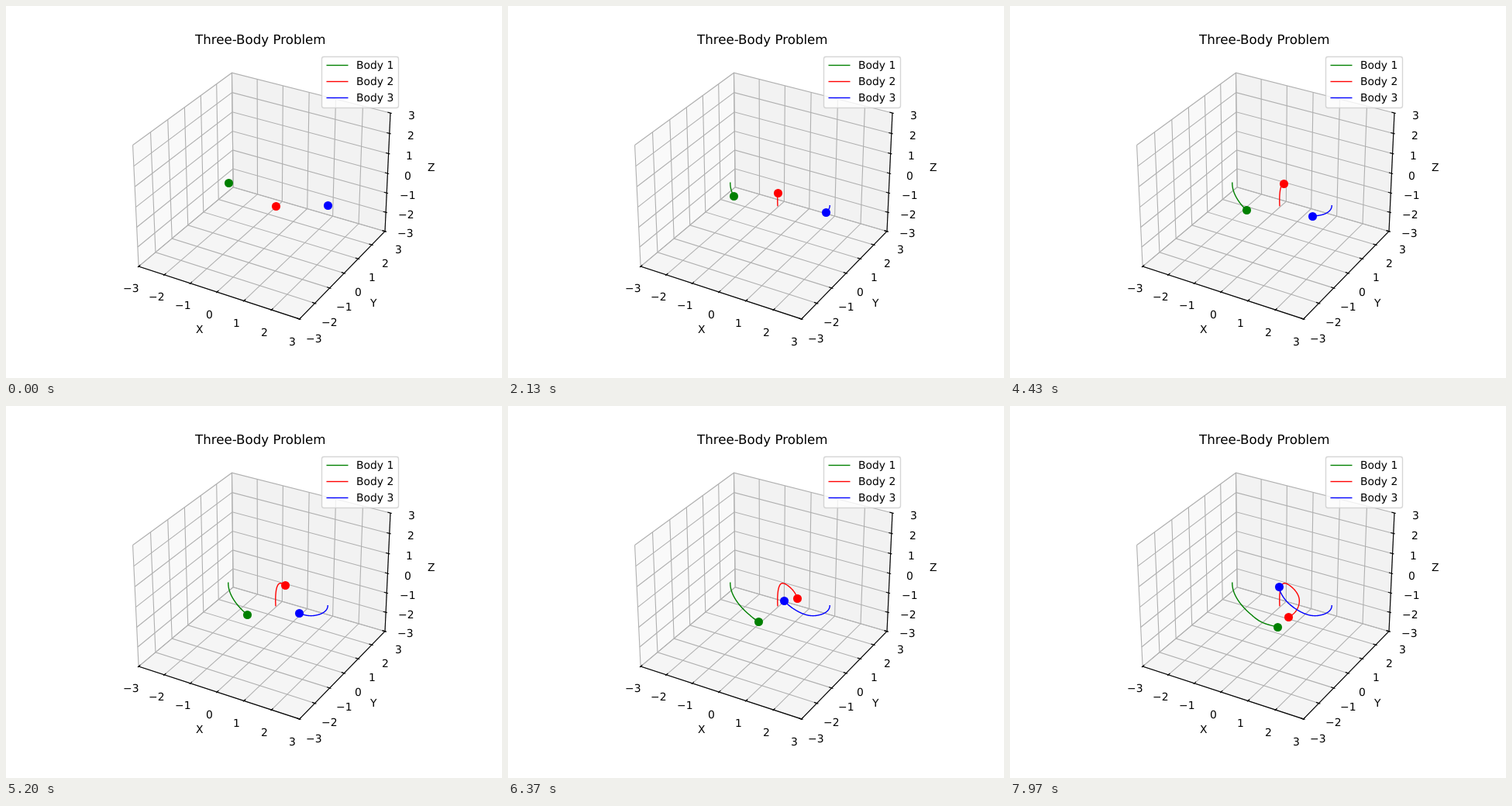
Recreate the animation shown at these times as an HTML page with a canvas. Size 640 by 480 pixels, loop 8000 ms.

```html
<!DOCTYPE html>
<html lang="en">
<head>
<meta charset="utf-8">
<title>Three-Body Problem</title>
<style>
  html, body { margin: 0; width: 100%; height: 100%; overflow: hidden; background: #fff; }
  canvas { display: block; }
</style>
</head>
<body>
<canvas id="stage" width="640" height="480"></canvas>
<script>
const ctx = document.getElementById('stage').getContext('2d');
const LOOP = 8000, STEP = 100 / 3, LIM = 3;
const BODIES = [
  { name: 'Body 1', color: '#008000' },
  { name: 'Body 2', color: '#ff0000' },
  { name: 'Body 3', color: '#0000ff' }
];
// Time in ms, then x and y of each body
const KNOTS = [
  [0, 286.8, 227.6, 348, 258.4, 415.2, 257],
  [2130, 291, 245, 348.2, 241, 410.3, 266],
  [3600, 299, 257, 350.3, 232, 400, 270],
  [5200, 311, 269, 360, 231, 378, 267],
  [6370, 323, 278, 373, 248, 356, 251],
  [7170, 333, 282, 370, 263, 348, 238],
  [7970, 345, 285, 359, 272, 347, 233]
];
const TICKS = [-3, -2, -1, 0, 1, 2, 3];

// Perspective view: elevation 30°, azimuth -60°, box aspect 4:4:3
function project([x, y, z]) {
  const px = x * 0.19841, py = y * 0.19841, pz = z * 0.14881;
  const c = Math.sqrt(3) / 2;
  const right = c * px + 0.5 * py;
  const up = -0.25 * px + c / 2 * py + c * pz;
  const depth = 10 - (c / 2 * px - 0.75 * py + 0.5 * pz);
  return [333 + 1997.8 * right / depth, 237.4 - 1997.8 * up / depth];
}

function trace(g, points) {
  g.beginPath();
  points.forEach(([x, y]) => g.lineTo(x, y));
}

function line(g, points, color, width) {
  trace(g, points);
  g.strokeStyle = color;
  g.lineWidth = width;
  g.stroke();
}

function pane(g, color, corners) {
  trace(g, corners.map(project));
  g.fillStyle = color;
  g.fill();
}

function text(g, str, x, y, size = 13.89) {
  g.font = `${size}px "DejaVu Sans", sans-serif`;
  g.textRendering = 'geometricPrecision';
  g.fillStyle = '#000';
  g.fillText(str, Math.round(x), Math.round(y));
}

// The pen starts half an ink width left of x
function centered(g, str, x, y, size = 13.89) {
  g.font = `${size}px "DejaVu Sans", sans-serif`;
  const ink = g.measureText(str);
  text(g, str, x - (ink.actualBoundingBoxLeft + ink.actualBoundingBoxRight) / 2, y, size);
}

function drawAxes(g) {
  const L = LIM, PAD = 0.498;
  g.fillStyle = '#fff';
  g.fillRect(0, 0, 640, 480);
  pane(g, '#f9f9f9', [[-L, -L, -L], [-L, L, -L], [-L, L, L], [-L, -L, L]]);
  pane(g, '#f2f2f2', [[-L, L, -L], [L, L, -L], [L, L, L], [-L, L, L]]);
  pane(g, '#f5f5f5', [[-L, -L, -L], [L, -L, -L], [L, L, -L], [-L, L, -L]]);

  // at: point on the axis moved out by d along the tick and e along the other edge
  const axes = [
    { at: (v, d, e) => [v, -L - d, -L - e], grid: v => [[v, -L, -L], [v, L, -L], [v, L, L]] },
    { at: (v, d, e) => [L + d, v, -L - e], grid: v => [[L, v, -L], [-L, v, -L], [-L, v, L]] },
    { at: (v, d, e) => [L + d, L + e, v], grid: v => [[L, L, v], [-L, L, v], [-L, -L, v]] }
  ];
  for (const { grid } of axes)
    for (const v of TICKS) line(g, grid(v).map(project), '#b0b0b0', 1.11);

  for (const { at } of axes) {
    line(g, [at(-L, 0, 0), at(L, 0, 0)].map(project), '#000', 1.11);
    for (const v of TICKS) {
      line(g, [at(v, -0.1, 0), at(v, 0.05, 0)].map(project), '#000', 1.11);
      const [x, y] = project(at(v, PAD, PAD));
      centered(g, v < 0 ? '\u2212' + -v : '' + v, x, y + 11);
    }
  }
  centered(g, 'X', 249.6, 422);
  centered(g, 'Y', 475, 388);
  centered(g, 'Z', 548, 213);
  centered(g, 'Three-Body Problem', 328, 49, 16.67);
}

function drawLegend(g) {
  g.beginPath();
  g.roundRect(407.5, 65.5, 99, 66, 2.8);
  g.fillStyle = 'rgba(255,255,255,.8)';
  g.fill();
  g.strokeStyle = 'rgba(204,204,204,.8)';
  g.lineWidth = 1.39;
  g.stroke();
  BODIES.forEach(({ name, color }, i) => {
    const y = 76.5 + i * 21;
    line(g, [[413.5, y], [441.5, y]], color, 1.39);
    text(g, name, 452, y + 4.5);
  });
}

// Cubic spline with continuous acceleration and parabolic ends
function makeCurve(col) {
  const n = KNOTS.length - 1, t = KNOTS.map(k => k[0]), p = KNOTS.map(k => k[col]);
  const h = i => t[i + 1] - t[i], s = i => (p[i + 1] - p[i]) / h(i);
  const m = p.map(() => 0);
  for (let pass = 0; pass < 60; pass++) {
    m[0] = 2 * s(0) - m[1];
    for (let i = 1; i < n; i++) {
      const a = 1 / h(i - 1), b = 1 / h(i);
      m[i] = (3 * (s(i - 1) * a + s(i) * b) - m[i - 1] * a - m[i + 1] * b) / (2 * (a + b));
    }
    m[n] = 2 * s(n - 1) - m[n - 1];
  }
  return time => {
    let i = 0;
    while (i < n - 1 && time > t[i + 1]) i++;
    const u = (time - t[i]) / h(i), w = 1 - u;
    return p[i] * w * w * (1 + 2 * u) + p[i + 1] * u * u * (3 - 2 * u)
      + h(i) * u * w * (m[i] * w - m[i + 1] * u);
  };
}

const paths = BODIES.map((_, b) => {
  const x = makeCurve(1 + 2 * b), y = makeCurve(2 + 2 * b);
  return Array.from({ length: 240 }, (_, k) => [x(k * STEP), y(k * STEP)]);
});

const plot = document.createElement('canvas');
plot.width = 640;
plot.height = 480;
drawAxes(plot.getContext('2d'));

function draw(now) {
  const step = Math.min(239, Math.floor((now % LOOP + 5) / STEP));
  ctx.drawImage(plot, 0, 0);
  ctx.lineJoin = 'round';
  BODIES.forEach(({ color }, b) => line(ctx, paths[b].slice(0, step + 1), color, 1.39));
  BODIES.forEach(({ color }, b) => {
    const [x, y] = paths[b][step];
    ctx.beginPath();
    ctx.arc(Math.round(x) + 0.5, Math.round(y) + 0.5, 5.55, 0, 2 * Math.PI);
    ctx.fillStyle = color;
    ctx.fill();
  });
  drawLegend(ctx);
}

const start = performance.now();
function tick() {
  draw(performance.now() - start);
  requestAnimationFrame(tick);
}
tick();
</script>
</body>
</html>
```
